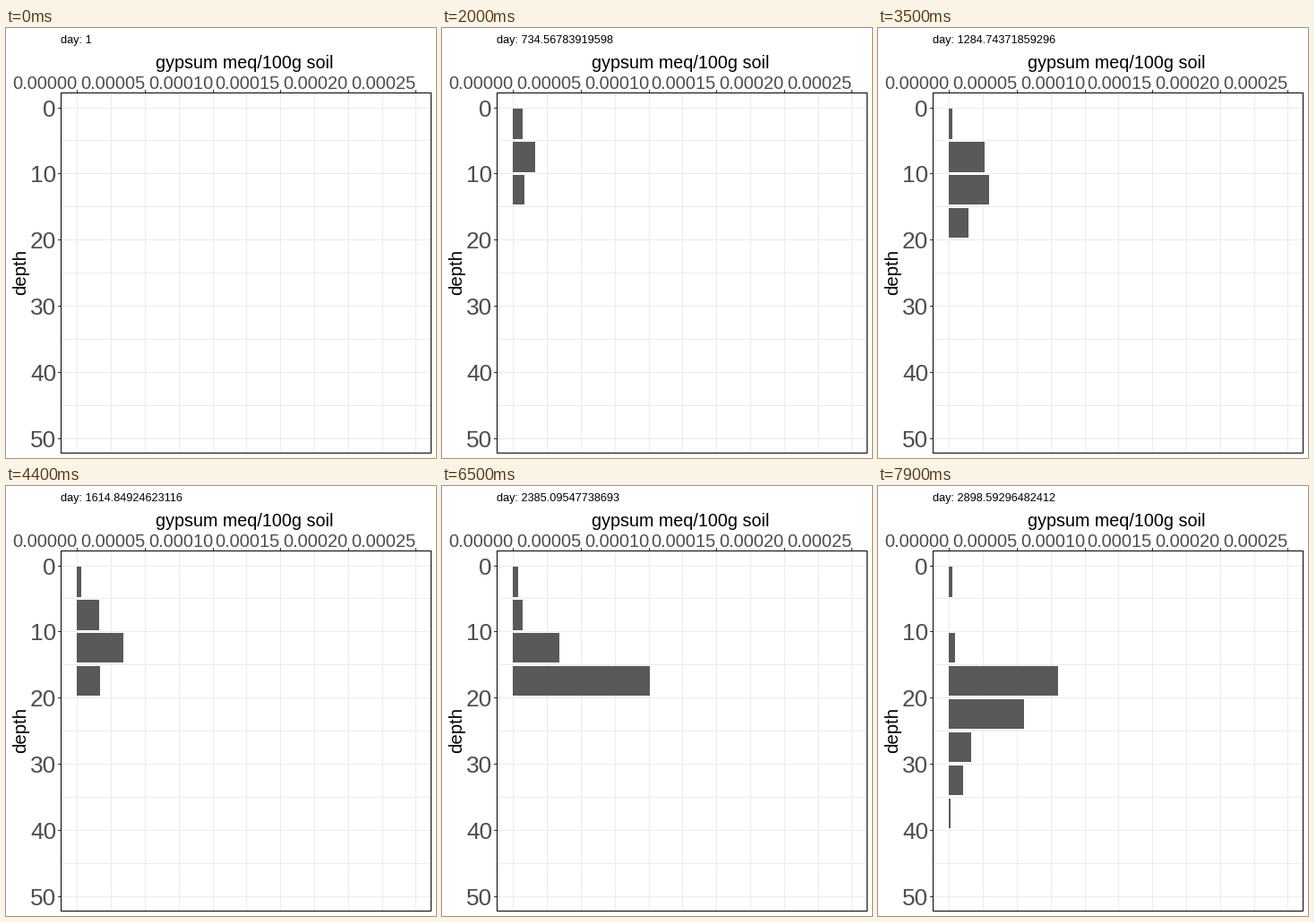
A matplotlib script for the animation above (8000 ms loop, 480 by 480 pixels).

```python
import numpy as np
import matplotlib.pyplot as plt
from matplotlib.animation import FuncAnimation
from matplotlib.patches import Rectangle

SIZE, DPI = 480, 100
FRAMES, INTERVAL = 80, 100
DAY_STEP = 7299 / 199

LEFT, RIGHT, TOP, BOTTOM = 61, 474, 72, 474
X0, X_HALF = 79.8, 37.8        # zero and half a major step across
Y0, Y_HALF = 89.0, 36.92       # zero and five depth units down
GRID, BAR, LABEL, TICK = "#ebebeb", "#595959", "#4d4d4d", "#333333"

# Bar lengths in pixels: upper layers move between shared key times,
# deeper ones fill evenly once the salt front reaches them.
KEYS = [0, 20, 35, 44, 55, 65, 79]
UPPER = [
    [0, 11, 4, 5, 18, 6, 4],
    [0, 25, 40, 25, 28, 11, 0],
    [0, 13, 45, 52, 76, 52, 7],
    [0, 0, 22, 26, 53, 153, 122],
]
FRONT, DEEP = 72, [84, 25, 16, 2]

plt.rcParams["font.family"] = "Liberation Sans"
fig = plt.figure(figsize=(SIZE / DPI, SIZE / DPI), dpi=DPI, facecolor="white")
ax = fig.add_axes([0, 0, 1, 1])
ax.set_xlim(0, SIZE)
ax.set_ylim(SIZE, 0)
ax.axis("off")


def box(x, y, w, h, color, z=1):
    return ax.add_patch(Rectangle((x, y), w, h, fc=color, lw=0,
                                  antialiased=False, zorder=z))


def label(x, y, text, px, color="black", ha="left", **kw):
    return ax.text(x, y, text, fontsize=px * 72 / DPI, color=color,
                   ha=ha, va="baseline", **kw)


for k in range(11):
    x, y = int(X0 + X_HALF * k), int(Y0 + Y_HALF * k)
    box(x, TOP, 1, BOTTOM - TOP, GRID)
    box(LEFT, y, RIGHT - LEFT, 1, GRID)
    if k % 2 == 0:
        box(x, TOP - 3, 1, 3, TICK)
        box(LEFT - 3, y, 3, 1, TICK)
        label(x, 68, f"{k * 0.000025:.5f}", 20, LABEL, "right")
        label(56, y + 10, str(k * 5), 26.3, LABEL, "right")

for x in (LEFT, RIGHT):
    box(x, TOP, 1, BOTTOM - TOP + 1, "black", 3)
for y in (TOP, BOTTOM):
    box(LEFT, y, RIGHT - LEFT + 1, 1, "black", 3)

label(266.5, 45, "gypsum meq/100g soil", 19.8, ha="center")
label(22, 272, "depth", 20.4, ha="center", rotation=90,
      rotation_mode="anchor")
day = label(61, 17, "", 12.8)

bars = []
for i in range(len(UPPER) + len(DEEP)):
    top, bottom = (int(edge + Y_HALF * i) for edge in (90.8, 124.1))
    bars.append(box(int(X0), top, 0, bottom - top, BAR, 2))


def lengths(n):
    upper = [np.interp(n, KEYS, row) for row in UPPER]
    fill = max(0, (n - FRONT) / (FRAMES - 1 - FRONT))
    return upper + [fill * end for end in DEEP]


def draw(n):
    day.set_text(f"day: {1 + n * DAY_STEP:.15g}")
    for bar, length in zip(bars, lengths(n)):
        width = round(float(length))
        bar.set_width(width)
        bar.set_visible(width > 0)
    return [day, *bars]


anim = FuncAnimation(fig, draw, frames=FRAMES, interval=INTERVAL,
                     repeat=True, repeat_delay=0, blit=False)
plt.show()
```
